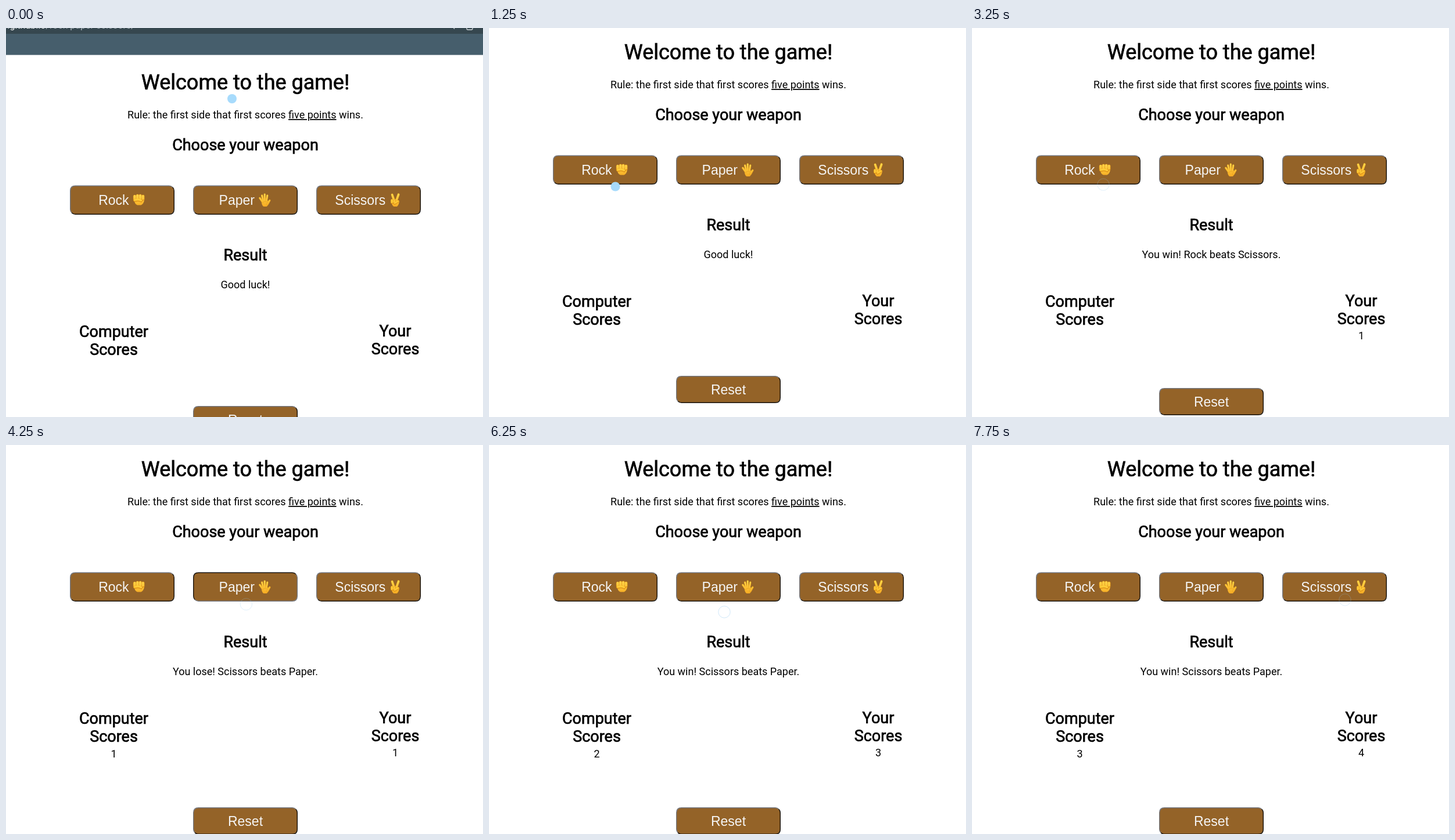
Write an HTML page that moves like this. It is 821 px wide and 671 px high and loops after 8 s.

```html
<!DOCTYPE html>
<html lang="en">
<head>
<meta charset="utf-8">
<title>Rock Paper Scissors</title>
<style>
html, body { margin: 0; width: 100%; height: 100%; overflow: hidden; background: #fff; }
svg { display: block; width: 821px; height: 671px; }
text { font: 18px Roboto, sans-serif; text-anchor: middle; }
.h1 { font-size: 36px; }
.h2 { font-size: 27px; }
.h1, .h2 { stroke: #000; stroke-width: .7px; }
.btn text { font: 23px "Liberation Sans", Arial, sans-serif; fill: #f5f5f5; }
.left text { text-anchor: start; }
.url { font-size: 16px; text-anchor: start; fill: #fff; }
.hand path { stroke-linecap: round; stroke-linejoin: round; }
</style>
</head>
<body>
<svg viewBox="0 0 821 671">
  <defs>
    <linearGradient id="skin" gradientUnits="userSpaceOnUse" x1="0" y1="234" x2="0" y2="256">
      <stop offset="0" stop-color="#ffd84a"/>
      <stop offset="1" stop-color="#f7ab22"/>
    </linearGradient>
  </defs>
  <g id="bar">
    <rect width="821" height="46.5" fill="#465e6c"/>
    <rect width="821" height="10" fill="#36474f"/>
    <text class="url" x="-6" y="1">s.github.io<tspan fill="#a9b4ba">/rock-paper-scissors/</tspan></text>
    <path d="M768-3l4 4.5M793-4V1q0 2 2 2h6q2 0 2-2v-5" fill="none" stroke="#cfd6da" stroke-width="1.3"/>
  </g>
  <g id="page">
    <text class="h1" x="412" y="53.5">Welcome to the game!</text>
    <text x="412" y="104">Rule: the first side that first scores <tspan text-decoration="underline">five points</tspan> wins.</text>
    <text class="h2" x="412" y="159">Choose your weapon</text>
    <g id="buttons"></g>
    <g class="hand" fill="none">
      <!-- fist -->
      <path d="M220.5 243Q221 252 226 253.5H232.5Q237.5 251 238.3 243Z" fill="url(#skin)"/>
      <path d="M221.5 238.5V243M226.3 237.3V242.5M231.1 237.3V242.5M235.8 238.3V243" stroke="#d98a14" stroke-width="5.4"/>
      <path d="M221.5 238V242.5M226.3 237V242M231.1 237V242M235.8 238V242.5" stroke="url(#skin)" stroke-width="4.2"/>
      <path d="M221.5 245.3Q228 243.2 232.5 246" stroke="#d98a14" stroke-width="5"/>
      <path d="M221.5 244.8Q228 242.8 232.5 245.3" stroke="#ffcb38" stroke-width="3.8"/>
      <!-- open hand -->
      <path d="M439.5 245.5Q440 254.5 443.5 256H448.5Q451.5 254 454 248L449.5 245Z" fill="url(#skin)"/>
      <path d="M441.5 248L436.8 241.3M442.8 246.5L440.6 237M445.3 246L445.2 235M448.2 246.5L449.8 237M449.5 252L453.8 245.5" stroke="#e39a1b" stroke-width="3.4"/>
      <path d="M441.5 248L436.8 241.3M442.8 246.5L440.6 237M445.3 246L445.2 235M448.2 246.5L449.8 237M449.5 252L453.8 245.5" stroke="url(#skin)" stroke-width="2.6"/>
      <!-- victory -->
      <path d="M663 246.5Q664 254 667.5 256H673Q676.5 253 677 246L670 243Z" fill="url(#skin)"/>
      <path d="M668.2 246L664.6 235.6M671.8 246L675.6 235.2" stroke="#e39a1b" stroke-width="4.1"/>
      <path d="M668.2 246L664.6 235.6M671.8 246L675.6 235.2" stroke="url(#skin)" stroke-width="3.2"/>
      <path d="M664.2 245.5V249M668.2 246.5V249.5" stroke="#d98a14" stroke-width="4.4"/>
      <path d="M664.2 245V248.5M668.2 246V249" stroke="#ffcb38" stroke-width="3.4"/>
      <path d="M674.5 247L669 250.5" stroke="#d98a14" stroke-width="4.2"/>
      <path d="M674.5 246.6L669 250" stroke="#ffc835" stroke-width="3.2"/>
    </g>
    <text class="h2" x="412" y="349">Result</text>
    <text id="msg" x="412" y="397"></text>
    <text class="h2" x="185.5" y="481">Computer</text>
    <text class="h2" x="185.5" y="512">Scores</text>
    <text id="comp" x="185.5" y="539"></text>
    <text class="h2" x="670" y="479.5">Your</text>
    <text class="h2" x="670" y="511">Scores</text>
    <text id="you" x="670" y="537"></text>
    <g id="reset"></g>
  </g>
  <circle id="pointer"/>
</svg>
<script>
const STEP = 250, STEPS = 32;
const $ = id => document.getElementById(id);

const draw = w => `You both chose ${w}. It's a draw. Try again.`;
const win = (a, b) => `You win! ${a} beats ${b}.`;
const lose = (a, b) => `You lose! ${a} beats ${b}.`;

// step, message, computer score, player score
const rounds = [
  [0, "Good luck!", "", ""],
  [7, draw("Rock"), "", ""],
  [12, win("Rock", "Scissors"), "", 1],
  [16, lose("Scissors", "Paper"), 1, 1],
  [18, lose("Scissors", "Paper"), 2, 1],
  [19, draw("Paper"), 2, 1],
  [21, win("Rock", "Scissors"), 2, 2],
  [24, win("Scissors", "Paper"), 2, 3],
  [26, lose("Scissors", "Paper"), 3, 3],
  [28, draw("Paper"), 3, 3],
  [31, win("Scissors", "Paper"), 3, 4]
];

// step, x, y of the pointer
const path = [
  [0, 389, 122], [1, 264, 313], [4, 222, 276], [6, 213, 271], [9, 213, 271],
  [13, 226, 270], [14, 228, 270], [15, 412, 276], [18, 414, 274], [20, 253, 272],
  [21, 253, 272], [23, 640, 268], [25, 405, 288], [27, 408, 280], [30, 642, 267], [32, 642, 267]
];
const travel = [19, 21, 22, 24, 28, 29];
const presses = { 6: 0, 11: 0, 15: 1, 17: 1, 23: 2, 27: 1 };

const LIGHT = "#73757c", DARK = "#17130f";

function button(x, y, h, label, textX) {
  const r = 8.5, k = 2.5, w = 178.6, X = x + .7, Y = y + .7, H = h - 1.4;
  const edges = [
    `M${X + k} ${Y + H - k}Q${X} ${Y + H - 5} ${X} ${Y + H - r}V${Y + r}Q${X} ${Y} ${X + r} ${Y}H${X + w - r}Q${X + w - 5} ${Y} ${X + w - k} ${Y + k}`,
    `M${X + w - k} ${Y + k}Q${X + w} ${Y + 5} ${X + w} ${Y + r}V${Y + H - r}Q${X + w} ${Y + H} ${X + w - r} ${Y + H}H${X + r}Q${X + 5} ${Y + H} ${X + k} ${Y + H - k}`
  ];
  return `<g class="btn${textX ? " left" : ""}">
    <rect x="${X}" y="${Y}" width="${w}" height="${H}" rx="${r}" fill="#946328"/>
    ${edges.map((d, i) => `<path d="${d}" fill="none" stroke-width="1.4" stroke="${i ? DARK : LIGHT}"/>`).join("")}
    <text x="${textX || x + 90}" y="${y + h / 2 + 8.2}">${label}</text></g>`;
}

$("buttons").innerHTML =
  button(110, 219.5, 50.5, "Rock", 159.2) +
  button(322, 219.5, 50.5, "Paper", 366.6) +
  button(534, 219.5, 50.5, "Scissors", 566.3);
$("reset").innerHTML = button(322, 600, 47, "Reset");
const edgePairs = [...$("buttons").children].map(b => b.querySelectorAll("path"));

function pointerAt(step) {
  const i = path.findIndex(p => p[0] > step);
  const [s0, x0, y0] = path[i - 1], [s1, x1, y1] = path[i];
  const u = (step - s0) / (s1 - s0);
  return [x0 + (x1 - x0) * u, y0 + (y1 - y0) * u];
}

function set(el, attrs) {
  for (const k in attrs) el.setAttribute(k, attrs[k]);
}

function render(step) {
  const [, msg, comp, you] = rounds.filter(r => r[0] <= step).pop();
  $("msg").textContent = msg;
  $("comp").textContent = comp;
  $("you").textContent = you;
  set($("reset"), { transform: `translate(0 ${comp ? 25 : you ? 21 : 0})` });
  set($("page"), { transform: `translate(0 ${step ? 0 : 52})` });
  set($("bar"), { visibility: step ? "hidden" : "visible" });

  edgePairs.forEach((pair, i) => {
    const down = presses[step] === i;
    set(pair[0], { stroke: down ? DARK : LIGHT });
    set(pair[1], { stroke: down ? LIGHT : DARK });
  });

  const [cx, cy] = pointerAt(step);
  const dot = step < 6 || travel.includes(step);
  set($("pointer"), {
    cx, cy,
    r: dot ? 8 : 10.2,
    fill: dot ? "#a7dbfc" : "none",
    stroke: dot ? "none" : "#8fc6ee",
    "stroke-opacity": step < 10 ? .12 : step === 25 ? .42 : .28
  });
}

let last = -1;
const start = performance.now();
function tick() {
  const step = Math.floor((performance.now() - start) / STEP) % STEPS;
  if (step !== last) render(last = step);
  requestAnimationFrame(tick);
}
tick();
</script>
</body>
</html>
```
